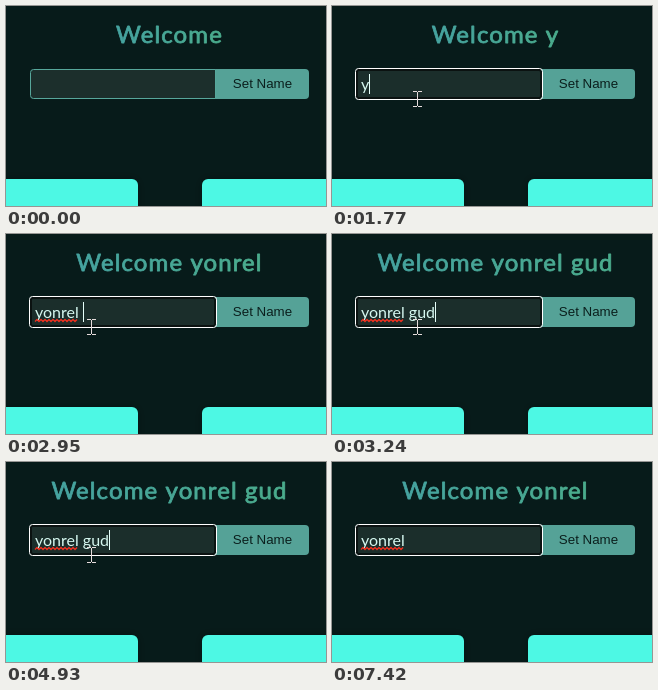
Recreate the animation shown at these times as an HTML page with a canvas. Size 320 by 200 pixels, loop 7820 ms.

```html
<!DOCTYPE html>
<html lang="en">
<head>
<meta charset="utf-8">
<title>Welcome form</title>
<style>
  html, body { margin: 0; width: 100%; height: 100%; overflow: hidden; background: #071b1a; }
  canvas { display: block; }
</style>
</head>
<body>
<canvas width="320" height="200"></canvas>
<script>
const ctx = document.querySelector('canvas').getContext('2d');
const LOOP = 7820;
const NAME = 'yonrel gudner';
const WORD = NAME.split(' ')[0];

// One character more or less at each of these times
const TYPED = [1770, 1960, 2160, 2450, 2650, 2850, 2950, 3040, 3140, 3240, 3440, 3540, 3730];
const DELETED = [4630, 4830, 4930, 5130, 5230, 5330, 5530];
const CARET = [[880, 1370], [1770, 4330], [4830, 5330], [5930, 6430], [6930, 7420]];
const POINTER = [300, 400, 490, 590, 690];
const FOCUS = 880, LEAVE = 6530;

const INPUT_FONT = '16px Lato, sans-serif';
const CYAN = '#4df8e4';
const passed = (times, t) => times.filter(at => t >= at).length;

function box(x, y, w, h, radii, fill, stroke, lineWidth = 1) {
  ctx.beginPath();
  ctx.roundRect(x, y, w, h, radii);
  if (fill) { ctx.fillStyle = fill; ctx.fill(); }
  if (stroke) { ctx.strokeStyle = stroke; ctx.lineWidth = lineWidth; ctx.stroke(); }
}

function label(text, x, y, font, color, align = 'left') {
  ctx.font = font;
  ctx.textAlign = align;
  ctx.fillStyle = color;
  ctx.fillText(text, x, y);
}

function textWidth(text, font) {
  ctx.font = font;
  return ctx.measureText(text).width;
}

function drawTitle(text) {
  const font = '24px Lato, sans-serif';
  ctx.letterSpacing = '1.1px';
  const half = textWidth(text, font) / 2;
  const paint = ctx.createLinearGradient(163.5 - half, 0, 163.5 + half, 0);
  paint.addColorStop(0, '#45a3a0');
  paint.addColorStop(1, '#4aac8c');
  label(text, 163.5, 37, font, paint, 'center');
  // A round outline softens the letter ends
  ctx.strokeStyle = paint;
  ctx.lineWidth = 0.8;
  ctx.lineJoin = 'round';
  ctx.strokeText(text, 163.5, 37);
  ctx.letterSpacing = '0px';
}

function drawSquiggle(x, y, width) {
  ctx.beginPath();
  for (let dx = 0; dx <= width; dx += 2) ctx.lineTo(x + dx, y + (dx % 4 ? -1 : 1));
  ctx.strokeStyle = '#f0301f';
  ctx.lineWidth = 1.3;
  ctx.stroke();
}

function drawIBeam(x, y) {
  ctx.fillStyle = '#e6dcdc';
  ctx.fillRect(x, y - 7, 1, 14);
  for (const end of [-8, 7]) {
    ctx.fillRect(x - 4, y + end, 4, 1);
    ctx.fillRect(x + 1, y + end, 4, 1);
  }
}

function drawArrow(x, y) {
  ctx.save();
  ctx.translate(x + 0.5, y + 0.5);
  ctx.fillStyle = '#fff';
  ctx.strokeStyle = '#111';
  ctx.lineWidth = 1;
  const arrow = new Path2D('M0 0V15L3.5 11.7L6 17L8 16L5.7 10.8H10.5Z');
  ctx.fill(arrow);
  ctx.stroke(arrow);
  ctx.restore();
}

function drawPointer(t) {
  const step = passed(POINTER, t);
  if (!step || t >= LEAVE) return;
  if (step === POINTER.length) return drawIBeam(85, 93);
  const k = (step - 1) / 4;
  drawArrow(Math.round(61 + 24 * k), Math.round(93 + 62 * (1 - k) ** 1.7));
}

function drawCards() {
  ctx.save();
  ctx.shadowColor = 'rgba(0, 0, 0, 0.3)';
  ctx.shadowBlur = 8;
  box(-10, 173, 142, 40, 6, CYAN);
  box(196, 173, 142, 40, 6, CYAN);
  ctx.restore();
}

function draw(t) {
  const typed = NAME.slice(0, passed(TYPED, t) - passed(DELETED, t));

  ctx.fillStyle = '#071b1a';
  ctx.fillRect(0, 0, 320, 200);
  drawTitle(`Welcome ${typed}`.trim());

  box(209, 63, 94, 30, [0, 4, 4, 0], '#55a297');
  label('Set Name', 256.5, 82, '13.333px "Liberation Sans", Arial, sans-serif', '#0b1f1d', 'center');
  if (t < FOCUS) {
    box(24.5, 63.5, 185, 29, [3, 0, 0, 3], '#1c2f2c', '#57a79b');
  } else {
    box(25, 64, 184, 28, 2, '#1b2e2b', '#0b1211', 2);
    box(23.5, 62.5, 187, 31, 3, null, '#fff');
  }

  label(typed, 29, 84, INPUT_FONT, '#d6f8f0');
  if (typed.length > WORD.length || t >= LEAVE) {
    drawSquiggle(29, 86.5, textWidth(WORD, INPUT_FONT));
  }
  if (CARET.some(([on, off]) => t >= on && t < off)) {
    ctx.fillStyle = '#e6fffa';
    ctx.fillRect(Math.round(29 + textWidth(typed, INPUT_FONT)), 68, 1, 20);
  }

  drawCards();
  drawPointer(t);
}

const start = performance.now();
function tick() {
  draw((performance.now() - start) % LOOP);
  requestAnimationFrame(tick);
}
tick();
</script>
</body>
</html>
```
